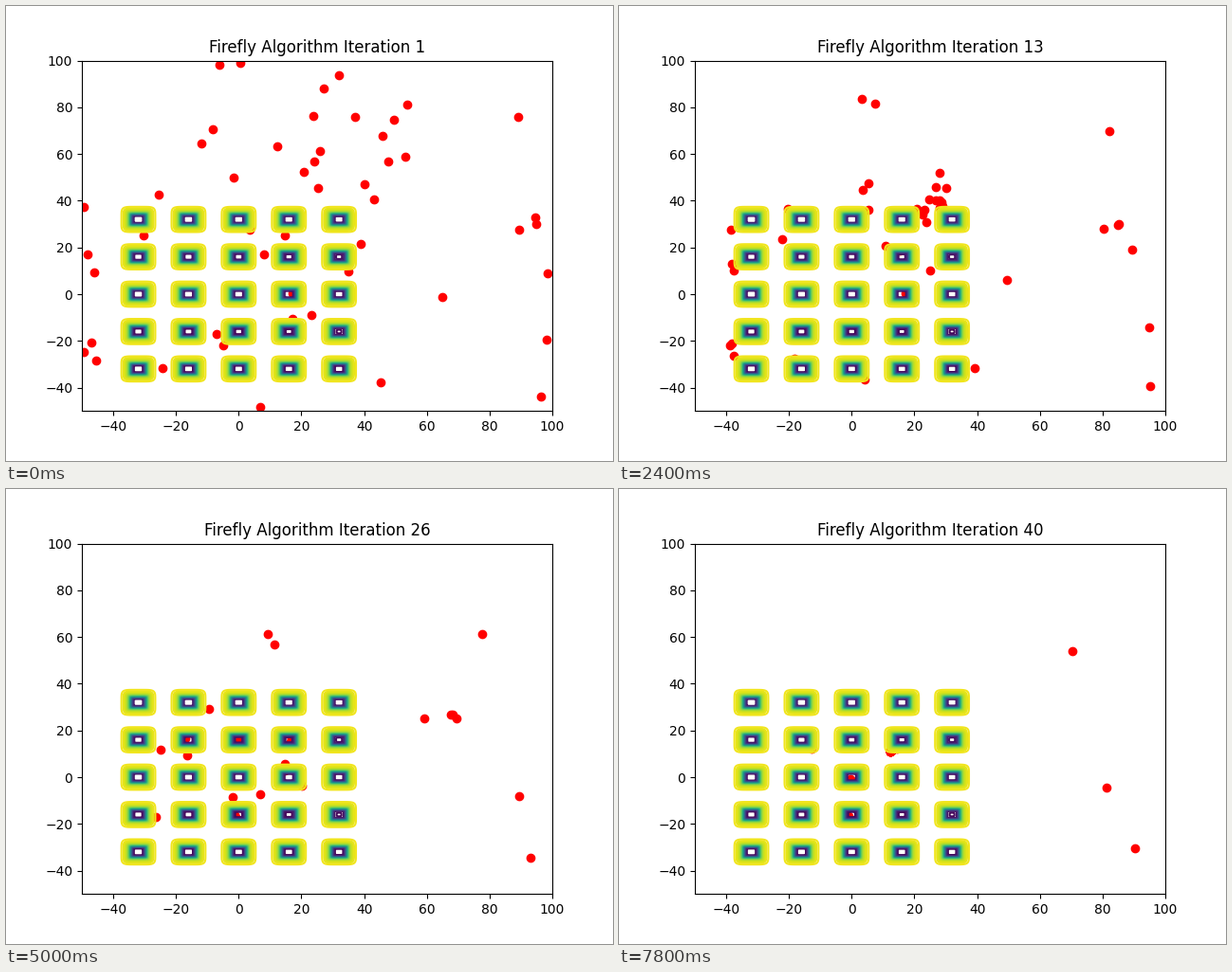
Recreate the animation shown at these times as a matplotlib script. Size 640 by 480 pixels, loop 8000 ms.

```python
import math

import numpy as np
import matplotlib.pyplot as plt
from matplotlib.animation import FuncAnimation

STEPS = 40
PULL, REACH = 0.075, 12  # attraction strength and its decay length
LOW, HIGH = -50, 100

START = np.array([
    (-6.2, 98.2), (0.5, 99), (32, 93.8), (27.1, 88), (23.8, 76.3),
    (37.1, 75.9), (53.7, 81.2), (49.5, 74.7), (45.9, 67.8), (47.7, 56.8),
    (53.1, 58.9), (25.9, 61.3), (24.1, 56.8), (20.8, 52.4), (25.3, 45.5),
    (12.3, 63.3), (-8.3, 70.6), (-11.9, 64.5), (-1.6, 49.9), (40.1, 47.1),
    (43.1, 40.6), (89.1, 75.9), (94.5, 32.9), (94.9, 30), (89.4, 27.6),
    (98.5, 8.9), (98.2, -19.5), (96.4, -43.8), (64.9, -1.2), (45.3, -37.7),
    (6.9, -48.3), (-49.4, 37.3), (-48.2, 17), (-46, 9.3), (-47, -20.7),
    (-49.4, -24.8), (-45.5, -28.4), (-25.5, 42.6), (-30.3, 25.2), (-24.3, -31.7),
    (-7, -17.1), (-4.9, -21.9), (3.5, 27.6), (8.1, 17), (14.7, 25.2),
    (38.9, 21.5), (35, 9.7), (23.2, -8.9), (17.1, -10.6), (17, 0.3),
])


def foxholes(x, y):
    """De Jong's fifth function: 25 wells on a flat plateau."""
    wells = np.arange(-32, 33, 16)
    total = np.full(np.shape(x), 1 / 500)
    for j in range(25):
        total += 1 / (j + 1 + (x - wells[j % 5]) ** 6 + (y - wells[j // 5]) ** 6)
    return 1 / total


def fly(swarm):
    """Move each firefly towards every one with a lower cost."""
    swarm = swarm.copy()
    cost = foxholes(*swarm.T)
    for i in range(len(swarm)):
        for j in np.flatnonzero(cost < cost[i]):
            gap = swarm[j] - swarm[i]
            swarm[i] += PULL * math.exp(-math.hypot(*gap) / REACH) * gap
    return swarm


history = [START]
while len(history) < STEPS:
    history.append(fly(history[-1]))

fig, ax = plt.subplots(figsize=(6.4, 4.8), dpi=100)
axis = np.linspace(LOW, HIGH, 601)
X, Y = np.meshgrid(axis, axis)
ax.contour(X, Y, foxholes(X, Y), levels=np.arange(10, 500, 10),
           cmap="viridis", vmin=0, vmax=500)
dots = ax.scatter(*START.T, color="red")
ax.set_xlim(LOW, HIGH)
ax.set_ylim(LOW, HIGH)
title = ax.set_title("Firefly Algorithm Iteration 1")


def update(i):
    dots.set_offsets(history[i])
    title.set_text(f"Firefly Algorithm Iteration {i + 1}")
    return dots, title


anim = FuncAnimation(fig, update, frames=STEPS, interval=200, repeat=True)
plt.show()
```
